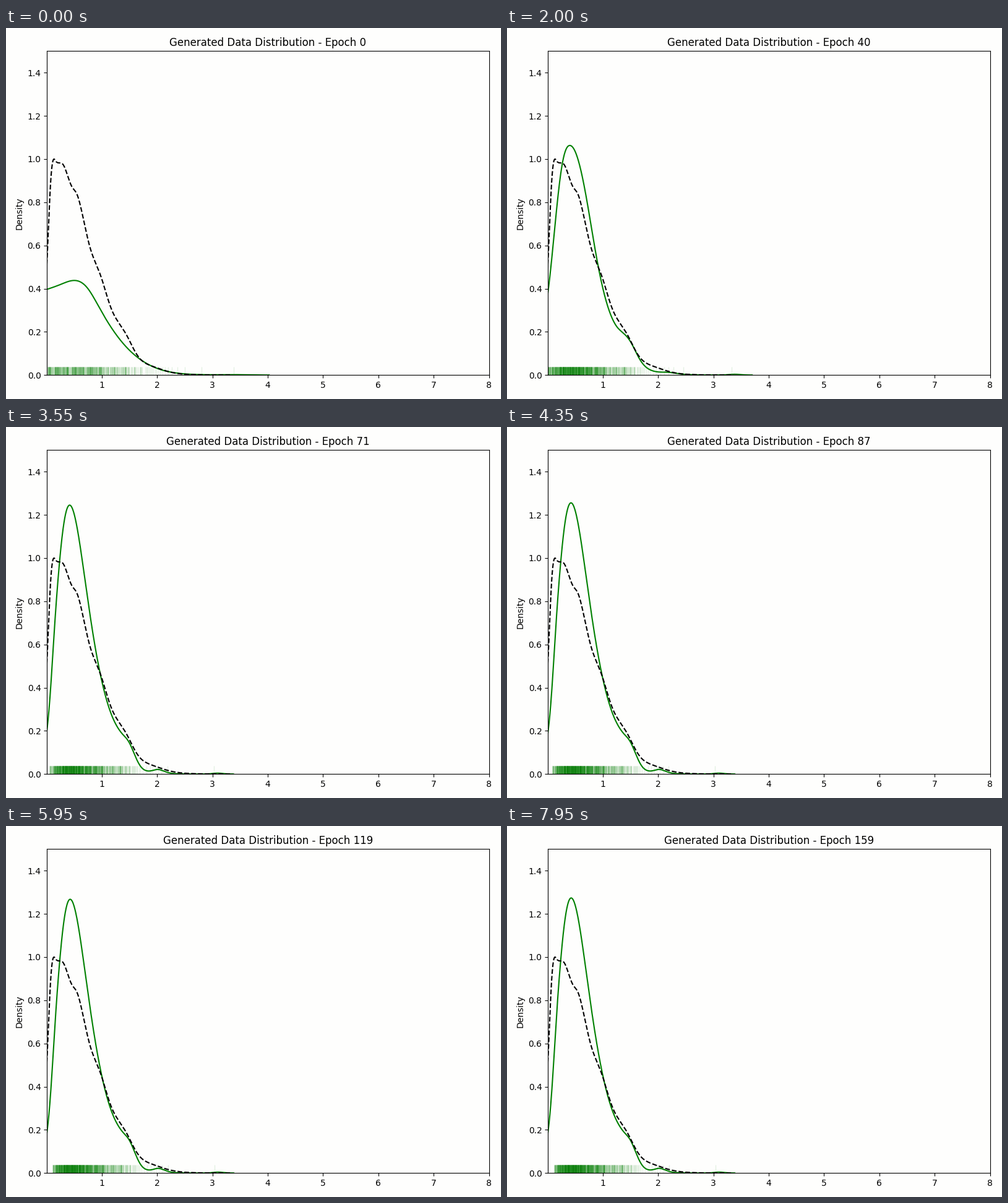
A matplotlib script for the animation above (8000 ms loop, 800 px wide and 600 px high).

```python
import numpy as np
import matplotlib.pyplot as plt
from matplotlib.animation import FuncAnimation

FRAMES, STEP_MS = 160, 50
SAMPLES = 1000
PAPER = "#fefefd"

grid = np.linspace(0, 5, 1001)


def log_spline(*points):
    """Natural cubic spline through the logarithm of a few key points."""
    px, py = np.array(points).T
    cubes = np.abs(px[:, None] - px) ** 3
    line = np.c_[np.ones_like(px), px]
    system = np.block([[cubes, line], [line.T, np.zeros((2, 2))]])
    c = np.linalg.solve(system, np.r_[np.log(py), 0, 0])
    return lambda x: np.exp(np.abs(x[:, None] - px) ** 3 @ c[:-2]
                            + c[-2] + c[-1] * x)


class Estimate:
    """Smooth body plus the small bump of one outlying sample."""

    def __init__(self, outlier, bandwidth, *points):
        self.body = log_spline(*points)
        self.outlier, self.bandwidth = outlier, bandwidth
        self.end = outlier + 3 * bandwidth

    def __call__(self, x):
        z = (x - self.outlier) / self.bandwidth
        return self.body(x) + .4 / (SAMPLES * self.bandwidth) * np.exp(-z * z / 2)


real = log_spline(
    (.01, .53), (.06, .82), (.17, .99), (.3, .975), (.46, .872), (.55, .838),
    (.8, .58), (1, .445), (1.2, .29), (1.5, .16), (1.72, .068), (2, .033),
    (2.5, .004))
stages = [
    Estimate(3.35, .226, (0, .396), (.25, .419), (.5, .438), (.75, .4),
             (1, .292), (1.5, .115), (2, .031), (2.5, .0055)),
    Estimate(4.31, .177, (0, .385), (.35, .528), (.7, .582), (.92, .544),
             (1.5, .229), (1.95, .097), (2.3, .036), (2.57, .0265),
             (3.1, .0025)),
    Estimate(3.38, .107, (0, .365), (.12, .65), (.25, .95), (.4, 1.063),
             (.75, .752), (1.1, .31), (1.26, .222), (1.55, .132),
             (1.8, .033), (2, .0145), (2.2, .0125), (2.5, .003)),
    Estimate(3.08, .095, (0, .215), (.1, .55), (.2, .91), (.42, 1.23),
             (.7, .856), (1, .41), (1.2, .248), (1.37, .18), (1.5, .135),
             (1.65, .05), (1.82, .014), (1.98, .021), (2.25, .0035)),
]
epochs = [0, 20, 40, 57]


def density(epoch):
    if epoch >= epochs[-1]:
        # The last stage settles: it drifts right and grows a little.
        age = epoch - epochs[-1]
        shift = .025 * (1 - np.exp(-age / 15))
        height = 1 + .037 * (1 - np.exp(-age / 40))
        return height * stages[-1](grid - shift), stages[-1].end + shift
    k = np.searchsorted(epochs, epoch, side="right") - 1
    w = (epoch - epochs[k]) / (epochs[k + 1] - epochs[k])
    a, b = stages[k], stages[k + 1]
    return (1 - w) * a(grid) + w * b(grid), (1 - w) * a.end + w * b.end


# Fixed ranks: evenly spread in the tail, random elsewhere.
rng = np.random.default_rng(7)
ranks = np.r_[(np.arange(20) + .5) / SAMPLES, rng.uniform(.02, 1, SAMPLES - 20)]


def rug_positions(y, epoch):
    above = np.cumsum(y[::-1]) * (grid[1] - grid[0])
    x = np.interp(ranks[ranks < above[-1]], above, grid[::-1])
    return .6 + (x - .6) * (1 - .03 * min(epoch / epochs[-1], 1))


fig, ax = plt.subplots(figsize=(8, 6), dpi=100, facecolor=PAPER)
ax.set(facecolor=PAPER, xlim=(.01, 8), ylim=(0, 1.5), ylabel="Density")
title = ax.set_title("Generated Data Distribution - Epoch 0")
rug = ax.vlines([], 0, 1, color="green", alpha=.1, lw=1,
                transform=ax.get_xaxis_transform())
curve, = ax.plot([], [], color="green", lw=1.5)
shown = grid[grid <= 3.36]
ax.plot(shown, real(shown), "k--", lw=1.5)
fig.tight_layout()


def draw(epoch):
    y, end = density(epoch)
    keep = grid <= end
    curve.set_data(grid[keep], y[keep])
    rug.set_segments([[(x, 0), (x, .025)] for x in rug_positions(y, epoch)])
    title.set_text(f"Generated Data Distribution - Epoch {epoch}")
    return curve, rug, title


anim = FuncAnimation(fig, draw, frames=FRAMES, interval=STEP_MS,
                     repeat=True, repeat_delay=0)
plt.show()
```
